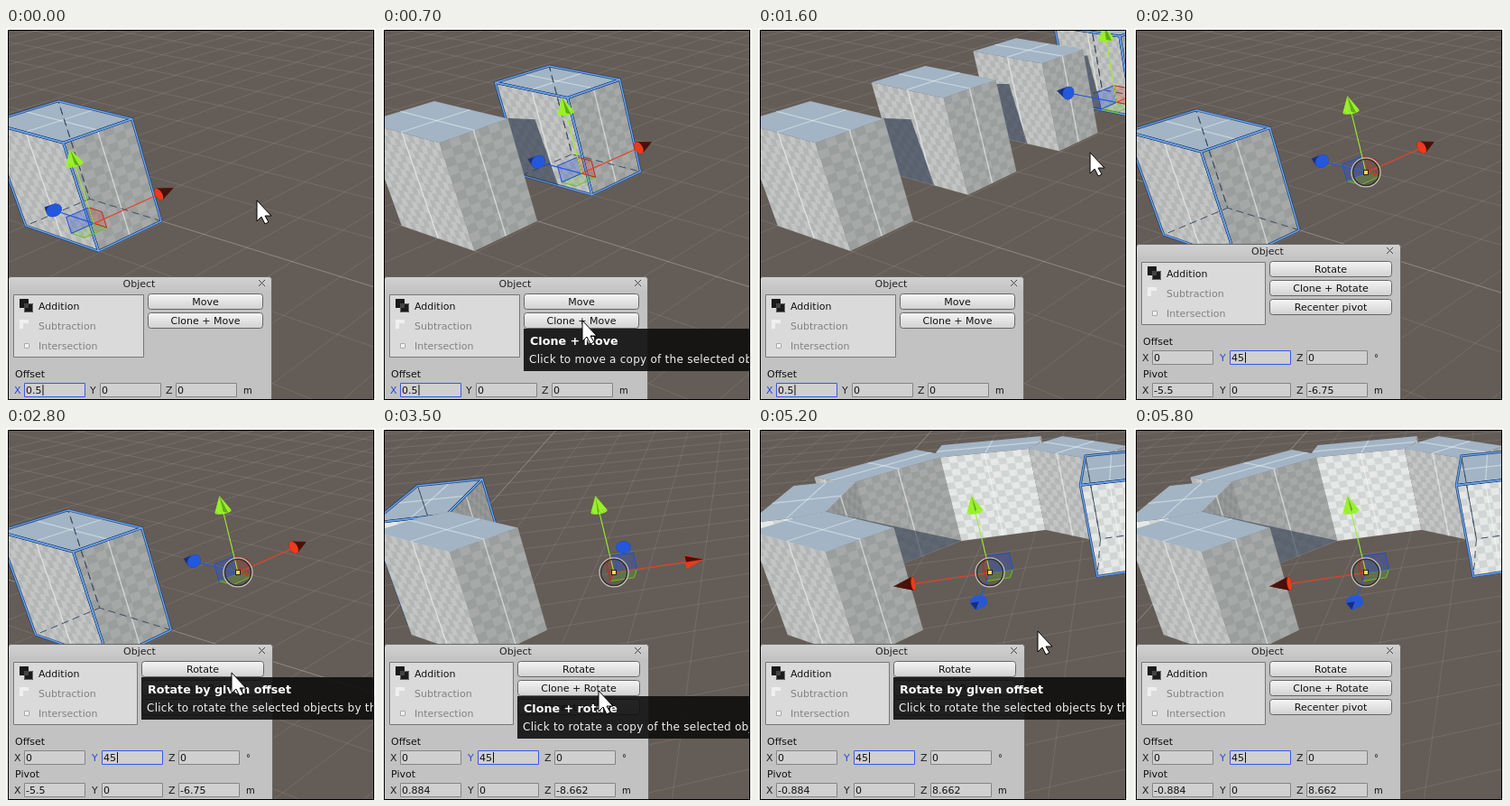
These frames come from a looping animation (410x412 px, 5.9 s). An HTML page with a canvas:

```html
<!DOCTYPE html>
<html lang="en">
<head>
<meta charset="utf-8">
<title>Clone, move and rotate</title>
<style>
html, body { margin: 0; width: 100%; height: 100%; overflow: hidden; background: #fff; }
canvas { display: block; }
</style>
</head>
<body>
<canvas id="stage" width="410" height="412"></canvas>
<script>
const g = document.getElementById('stage').getContext('2d');
const LOOP = 5900;
const FONT = '"DejaVu Sans", sans-serif';

// Box in ring coordinates: x runs outwards from the pivot, z along the ring
const OUTER = -2.97, INNER = -1.97, HALF = .97, TALL = 1.88, STEP = Math.PI / 4;
const HEADING = .407;
let pan = [0, 0];

// Homogeneous camera: pivot on screen plus one vector per world direction
const PIVOT = [305.8, 186.4, 1.243], RIGHT = [70, 0, 0];
const DEEP = [58.9, -19.5, .0781], UP = [-22.7, -67.6, -.03];
function camera(x, z, h, turn) {
  const c = Math.cos(HEADING + turn), s = Math.sin(HEADING + turn);
  const side = x * s - z * c, deep = x * c + z * s;
  return PIVOT.map((v, k) => v + RIGHT[k] * side + DEEP[k] * deep + UP[k] * h);
}
const flat = ([x, y, w]) => [x / w + pan[0], y / w + pan[1]];
const project = (x, z, h, turn) => flat(camera(x, z, h, turn));

const mix = (a, b, k) => a.map((v, i) => v + (b[i] - v) * k);
const shown = ([a, b, c]) => (b[0] - a[0]) * (c[1] - a[1]) > (b[1] - a[1]) * (c[0] - a[0]);
const passed = (times, t) => times.filter(x => t >= x).length;

function path(points) {
  g.beginPath();
  points.forEach(p => g.lineTo(p[0], p[1]));
}
function fill(points, color) { path(points); g.fillStyle = color; g.fill(); }
function stroke(points, color, width = 1, close = true) {
  path(points);
  if (close) g.closePath();
  g.strokeStyle = color;
  g.lineWidth = width;
  g.stroke();
}
function rect(x, y, w, h, color, border) {
  g.fillStyle = color;
  g.fillRect(x, y, w, h);
  if (border) { g.strokeStyle = border; g.lineWidth = 1; g.strokeRect(x + .5, y + .5, w - 1, h - 1); }
}
function text(s, x, y, color = '#111', font = '11px', align = 'left') {
  g.font = font + ' ' + FONT;
  g.textAlign = align;
  g.fillStyle = color;
  g.fillText(s, x, y);
}

function ground(turn, start) {
  rect(0, 0, 410, 412, '#645c56');
  for (const along of [0, 1]) {
    const a = camera(0, 0, 0, turn), b = camera(1 - along, along, 0, turn);
    const vanish = flat(b.map((v, k) => v - a[k]));
    for (let i = -9; i < 14; i++) {
      const p = along ? project(start + i, 0, 0, turn) : project(0, HALF + i, 0, turn);
      const main = along && !i;
      stroke([vanish, mix(vanish, p, 20)], `rgba(210,205,200,${main ? .4 : .14})`, 1, false);
    }
  }
}

// Checkered quad; corners run top left, top right, bottom right, bottom left
function wall([a, b, c, d], light, cols) {
  const p = (u, v) => mix(mix(a, b, u / cols), mix(d, c, u / cols), v / 13);
  fill([a, b, c, d], `rgb(${light},${light + 3},${light + 2})`);
  g.beginPath();
  for (let i = 0; i < cols; i++) for (let j = i % 2; j < 13; j += 2) {
    g.moveTo(...p(i, j));
    g.lineTo(...p(i + 1, j));
    g.lineTo(...p(i + 1, j + 1));
    g.lineTo(...p(i, j + 1));
  }
  g.fillStyle = 'rgba(70,75,78,.12)';
  g.fill();
  stroke([p(cols / 2, 0), p(cols / 2, 13)], 'rgba(248,250,250,.6)', 1.3, false);
}
// Walls of a prism over a footprint, each with its outward direction
function sides(foot, turn) {
  return foot.map(([x, z], k) => {
    const [x2, z2] = foot[(k + 1) % foot.length];
    return {
      quad: [project(x, z, TALL, turn), project(x2, z2, TALL, turn), project(x2, z2, 0, turn), project(x, z, 0, turn)],
      facing: HEADING + turn - Math.atan2(x - x2, z2 - z),
      size: Math.hypot(x2 - x, z2 - z)
    };
  });
}
// Inner corners are cut where a turned neighbour meets the box
function footprint(shift, before, after) {
  const slope = Math.tan(STEP / 2);
  const end = (s, cut) => [[OUTER + shift, s * HALF], ...(cut
    ? [[-HALF / slope, s * HALF], [INNER, -s * INNER * slope]]
    : [[INNER + shift, s * HALF]])];
  return [...end(-1, before), ...end(1, after).reverse()];
}
function box({ shift = 0, turn = 0, before, after, selected }) {
  const foot = footprint(shift, before, after);
  for (const { quad, facing, size } of sides(foot, turn)) {
    if (!shown(quad)) continue;
    const sun = Math.max(0, Math.cos(facing - 2.93));
    wall(quad, Math.round(150 + 82 * sun ** 3), Math.max(1, Math.round(size * 7)));
  }
  const top = (x, z) => project(x + shift, z, TALL, turn), mid = (OUTER + INNER) / 2;
  fill(foot.map(([x, z]) => project(x, z, TALL, turn)), '#a3b4c4');
  stroke([top(mid, -HALF), top(mid, HALF)], 'rgba(235,245,250,.5)', 1.2, false);
  stroke([top(OUTER, 0), top(INNER, 0)], 'rgba(235,245,250,.5)', 1.2, false);
  if (selected) outline(footprint(shift), turn);
}
function outline(foot, turn) {
  const quads = sides(foot, turn).map(s => s.quad);
  const front = [...quads.filter(shown), quads.map(q => q[0])];
  g.setLineDash([8, 5]);
  quads.filter(q => !shown(q)).forEach(q => stroke(q, '#3d4d63'));
  g.setLineDash([]);
  front.forEach(q => stroke(q, '#26426f', 2.8));
  front.forEach(q => stroke(q, '#6ba8f5', 1.3));
}

function gizmo(x, turn, ring) {
  const scale = 1.29 * camera(x, 0, 0, turn)[2];
  const at = (r, b, u) => project(x + r * scale, b * scale, u * scale, turn);
  const o = at(0, 0, 0), a = HEADING + turn;
  // Dot products with the direction of the viewer
  const redNear = 9 * Math.sin(a) - 15.9 * Math.cos(a) > 0 ? 1 : -1;
  const blueNear = -9 * Math.cos(a) - 15.9 * Math.sin(a) > 0 ? 1 : -1;
  const r = redNear * .25, b = blueNear * .25, u = .22;
  const plane = (p, q, both, color, tint) => {
    fill([o, p, both, q], tint);
    stroke([o, p, both, q], color);
  };
  plane(at(r, 0, 0), at(0, b, 0), at(r, b, 0), '#69c020', 'rgba(100,200,30,.2)');
  plane(at(r, 0, 0), at(0, 0, u), at(r, 0, u), '#234fd0', 'rgba(40,80,220,.3)');
  plane(at(0, b, 0), at(0, 0, u), at(0, b, u), '#c02818', 'rgba(220,40,20,.2)');

  const arm = (axis, near, color, dark) => {
    // Rotating the coordinates aims the same cone along each axis
    const aim = (...v) => at(...v.map((_, k) => v[(k - axis + 3) % 3]));
    const rim = Array.from({ length: 17 }, (_, k) =>
      aim(.8, .085 * Math.cos(k * Math.PI / 8), .085 * Math.sin(k * Math.PI / 8)));
    stroke([o, aim(.8, 0, 0)], color, 1.1, false);
    rim.slice(1).forEach((p, k) => fill([aim(1, 0, 0), rim[k], p], near ? color : dark));
    if (near) fill([aim(1, 0, 0), aim(.8, 0, 0), rim[axis === 2 ? 12 : 4]], dark);
    else fill(rim, color);
  };
  arm(1, blueNear > 0, '#2458dc', '#172f80');
  arm(0, redNear > 0, '#ec3a1c', '#4a1008');
  arm(2, true, '#9af02c', '#62aa18');
  if (!ring) return;
  for (const [radius, color] of [[16, '#c4c1bd'], [14.5, '#34302c']]) {
    g.beginPath();
    g.arc(...o, radius, 0, 7);
    g.strokeStyle = color;
    g.lineWidth = 1.3;
    g.stroke();
  }
  rect(o[0] - 3, o[1] - 3, 6, 6, '#222');
  rect(o[0] - 2, o[1] - 2, 4, 4, '#ffe23a');
}

function button(label, x, y, w, pressed) {
  const shade = g.createLinearGradient(0, y, 0, y + 18);
  shade.addColorStop(0, pressed ? '#a2a2a2' : '#f6f6f6');
  shade.addColorStop(1, pressed ? '#bcbcbc' : '#d0d0d0');
  g.beginPath();
  g.roundRect(x + .5, y + .5, w - 1, 17, 3);
  g.fillStyle = shade;
  g.fill();
  g.strokeStyle = '#666';
  g.lineWidth = 1;
  g.stroke();
  text(label, x + w / 2, y + 13, '#111', '11px', 'center');
}
function fields(y, values, focus, unit, step = 85.5) {
  values.forEach((v, i) => {
    const x = Math.round(20 + i * step), on = i === focus;
    text('XYZ'[i], x - 11, y + 12, on ? '#2848e0' : '#222');
    rect(x, y, 68, 16, '#d0d0d0', on ? '#3858e8' : '#858585');
    text(v, x + 2, y + 12);
    if (on) rect(x + 3 + g.measureText(v).width, y + 2, 1, 12, '#111');
  });
  text(unit, 20 + 2 * step + 75, y + 12, '#111', '10px');
}
function panel(y, right, boxRight) {
  const head = g.createLinearGradient(0, y, 0, y + 18);
  head.addColorStop(0, '#d2d2d2');
  head.addColorStop(1, '#c2c2c2');
  g.beginPath();
  g.roundRect(2.5, y + .5, right - 3, 420 - y, 3);
  g.fillStyle = head;
  g.fill();
  g.strokeStyle = '#666';
  g.lineWidth = 1;
  g.stroke();
  text('Object', right / 2, y + 12, '#222', '11px', 'center');
  stroke([[280, y + 4], [287, y + 11]], '#444', 1, false);
  stroke([[287, y + 4], [280, y + 11]], '#444', 1, false);
  rect(8, y + 20, boxRight - 8, 70, '#dadada', '#777');
  rect(15, y + 25, 10, 10, '#1a1a1a');
  rect(20, y + 30, 10, 10, '#1a1a1a', '#666');
  rect(20, y + 30, 5, 5, '#444');
  rect(15, y + 48, 10, 4, '#f0f0f0');
  rect(15, y + 48, 4, 10, '#f0f0f0');
  rect(20, y + 74, 6, 6, '#f2f2f2', '#aaa');
  ['Addition', 'Subtraction', 'Intersection'].forEach((s, i) =>
    text(s, 36, y + 37 + i * 22, i ? '#808080' : '#111'));
}
function tooltip(x, y, title, body) {
  rect(x, y, 407 - x, 47, 'rgba(14,14,14,.9)');
  text(title, x + 7, y + 18, '#fff', 'bold 12.7px');
  g.letterSpacing = '.25px';
  text(body, x + 6, y + 38, '#f2f2f2', '12px');
  g.letterSpacing = '0px';
}
// Pointer moves evenly between [time, x, y] stops and is away outside them
function pointer(t, stops) {
  const next = stops.findIndex(s => s[0] > t);
  if (next < 1) return;
  const [from, to] = [stops[next - 1], stops[next]];
  const [, x, y] = mix(from, to, (t - from[0]) / (to[0] - from[0]));
  const arrow = [[0, 0], [0, 23], [5, 18], [9, 26], [13, 24], [9, 17], [16, 17]].map(q => [x + q[0], y + q[1]]);
  fill(arrow, '#fff');
  stroke(arrow, '#000');
}

function moveScene(t) {
  pan = [0, 0];
  ground(0, INNER);
  const last = passed([600, 1000, 1400], t);
  for (let i = last; i >= 0; i--) {
    const shift = 2 * i, x = OUTER + shift;
    box({ shift, selected: i === last });
    if (i) fill([[HALF, 1.18], [.1, 1.3], [-.06, 0], [HALF, 0]].map(([z, h]) => project(x, z, h, 0)),
      'rgba(52,62,82,.7)');
  }
  gizmo((OUTER + INNER) / 2 + 2 * passed([700, 1100, 1500], t), 0);
  panel(275, 295, 153);
  button('Move', 157, 294, 128);
  button('Clone + Move', 157, 315, 128);
  text('Offset', 10, 387);
  fields(393, ['0.5', '0', '0'], 0, 'm', 84);
  if (t >= 400 && t < 1500) tooltip(157, 333, 'Clone + Move', 'Click to move a copy of the selected objects');
  pointer(t, [[0, 278, 191], [400, 222, 324], [1400, 222, 324], [1600, 368, 138], [1900, 410, 80]]);
}

const presses = [3400, 3800, 4100, 4500, 5000], clones = [3500, 3900, 4300, 4700, 5100];

function turnScene(t) {
  pan = [11, 10];
  const n = passed(clones, t), odd = n % 2;
  ground(odd * STEP, odd ? -3.38 : INNER);
  const nearness = i => Math.cos(HEADING + i * STEP + .515);
  const order = [...Array(n + 1).keys()].sort((a, b) => nearness(a) - nearness(b));
  for (const i of order) {
    if (!i && n) {
      const far = Math.min(n, 2) * STEP;
      fill([project(INNER, -.82, TALL, STEP), project(INNER, .82, 0, far),
        project(INNER, -.82, 0, far), project(INNER, -.82, 0, STEP)], 'rgba(58,68,86,.65)');
    }
    box({ turn: i * STEP, before: i > 0, after: i < n, selected: i === n });
  }
  gizmo(0, n * STEP, true);

  panel(239, 296, 146);
  button('Rotate', 150, 258, 136);
  button('Clone + Rotate', 150, 279, 136, passed(presses, t) > n);
  button('Recenter pivot', 150, 300, 136);
  text('Offset', 10, 351);
  fields(357, ['0', '45', '0'], 1, '°');
  text('Pivot', 10, 387);
  const c = Math.cos(n * STEP), s = Math.sin(n * STEP);
  const show = v => String(+v.toFixed(3));
  fields(393, [show(-5.5 * c + 6.75 * s), '0', show(-5.5 * s - 6.75 * c)], -1, 'm');

  if (t >= 2700 && t < 3000 || t >= 5200 && t < 5300)
    tooltip(150, 276, 'Rotate by given offset', 'Click to rotate the selected objects by the offset');
  else if (t >= 3000 && t < 5200)
    tooltip(150, 297, 'Clone + rotate', 'Click to rotate a copy of the selected objects');
  pointer(t, [[2600, 380, 266], [2800, 250, 271], [3000, 240, 291], [5000, 240, 291], [5200, 310, 225], [5500, 410, 140]]);
}

function frame(now) {
  const t = Math.floor(now % LOOP / 100) * 100;
  g.clearRect(0, 0, 410, 412);
  g.save();
  g.beginPath();
  g.rect(2, 2, 406, 410);
  g.clip();
  g.lineJoin = 'round';
  (t < 2200 ? moveScene : turnScene)(t);
  g.restore();
  g.strokeStyle = '#000';
  g.lineWidth = 1;
  g.strokeRect(2.5, 2.5, 405, 409);
  requestAnimationFrame(frame);
}
requestAnimationFrame(frame);
</script>
</body>
</html>
```
